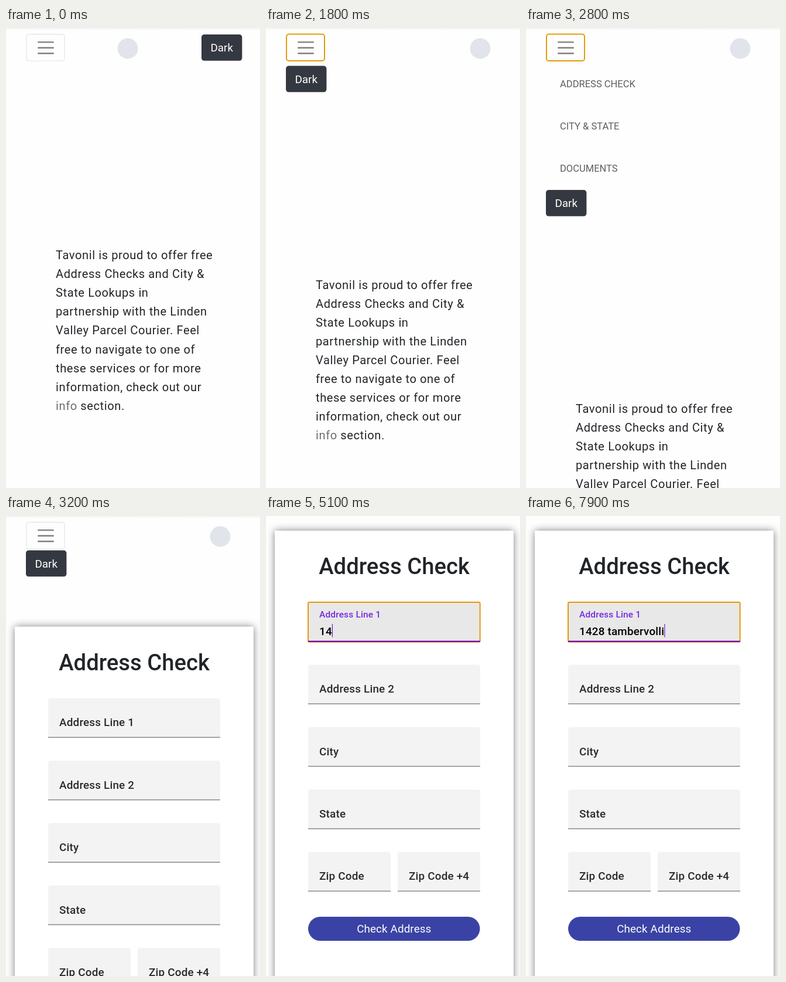
Recreate the animation shown at these times as an HTML page. Size 434 px wide and 784 px high, loop 8 s.

```html
<!DOCTYPE html>
<html lang="en">
<head>
<meta charset="utf-8">
<title>Address check</title>
<style>
  html, body { margin: 0; width: 100%; height: 100%; overflow: hidden; background: #fefefe; }
  svg { display: block; width: 434px; height: 784px; font-family: Roboto, sans-serif; font-size: 18.88px; }
  text { white-space: pre; }
  .lead { font-size: 20.06px; letter-spacing: .6px; fill: #212529; }
  .menu { font-size: 16.55px; fill: #5c5f63; }
  .title { font-size: 38.2px; font-weight: 500; fill: #212529; text-anchor: middle; }
  .label { font-weight: 500; letter-spacing: .18px; fill: #2b2b2b; }
  .entry { font-weight: 500; letter-spacing: .18px; fill: #000; }
  .card { fill: #fff; filter: drop-shadow(0 0 7px gray); }
  .ring { fill: none; stroke: #e59a0c; stroke-width: 2; }
</style>
</head>
<body>
<svg viewBox="0 0 434 784">
  <defs>
    <clipPath id="fold"><rect id="foldBox" x="0" y="57" width="434" height="0"/></clipPath>
    <linearGradient id="edge" x2="0" y2="1">
      <stop offset="0" stop-color="#f3f3f3"/><stop offset="1" stop-color="#fefefe"/>
    </linearGradient>
  </defs>
  <g id="page">
    <rect width="434" height="4" fill="url(#edge)"/>
    <g id="home"></g>
    <g id="form">
      <rect class="card" x="15" y="0" width="408" height="900"/>
      <text class="title" x="219" y="74.3">Address Check</text>
      <g id="fields"></g>
      <rect x="72" y="658" width="293.5" height="41" rx="20.5" fill="#3a43a5"/>
      <text x="218.8" y="685.3" fill="#fff" text-anchor="middle" letter-spacing=".1">Check Address</text>
      <g id="focus">
        <rect class="ring" x="72" y="122" width="293.7" height="67.5" rx="2"/>
        <rect id="line" y="187.6" height="2.4" fill="#780d98"/>
        <text id="entry" class="entry" x="91" y="177.5"></text>
        <rect id="caret" y="159" width="1.2" height="22.5" fill="#6a1fc0"/>
      </g>
    </g>
    <g id="menu" clip-path="url(#fold)"></g>
    <rect id="toggler" x="35" y="10.6" width="65" height="45.4" rx="4" fill="none"/>
    <path d="M55.2 24.1h25.6M55.2 33.7h25.6M55.2 43.3h25.6" stroke="#7f7f7f" stroke-width="2.36" stroke-linecap="round"/>
    <circle id="logo" cy="35" r="17.5" fill="#e1e4ea"/>
    <g id="dark">
      <rect width="69.4" height="44.8" rx="4.7" fill="#343840"/>
      <text x="15.4" y="29.2" fill="#fff">Dark</text>
    </g>
  </g>
</svg>
<script>
const LOOP = 8000, OPEN = 1783, CLOSE = 2890, FOLD = 350, MENU = 219;
const SCROLL_AT = 3800, SCROLL = 119, FOCUS = 4370;
const TYPED = '1428 tambervolli';
const KEYS = [4700, 5050, 5200, 5400, 5700, 5900, 6200, 6400, 6600, 6900, 7100, 7200, 7400, 7600, 7750, 7880];
const LEAD = [
  'Tavonil is proud to offer free', 'Address Checks and City &', 'State Lookups in',
  'partnership with the Linden', 'Valley Parcel Courier. Feel', 'free to navigate to one of',
  'these services or for more', 'information, check out our'
];

const $ = id => document.getElementById(id);
const clamp = x => Math.max(0, Math.min(1, x));
const set = (node, attrs) => { for (const k in attrs) node.setAttribute(k, attrs[k]); };
const show = (node, on) => { node.style.display = on ? '' : 'none'; };
const move = (node, x, y) => node.setAttribute('transform', `translate(${x} ${y})`);

function add(parent, tag, attrs, text) {
  const node = document.createElementNS('http://www.w3.org/2000/svg', tag);
  set(node, attrs);
  if (text) node.textContent = text;
  return parent.appendChild(node);
}

// CSS "ease": cubic-bezier(.25, .1, .25, 1)
function ease(x) {
  if (x <= 0 || x >= 1) return clamp(x);
  const bez = (a, b, u) => 3 * a * u * (1 - u) ** 2 + 3 * b * u * u * (1 - u) + u ** 3;
  let lo = 0, hi = 1;
  for (let i = 0; i < 24; i++) {
    const mid = (lo + hi) / 2;
    if (bez(.25, .25, mid) < x) lo = mid; else hi = mid;
  }
  return bez(.1, 1, lo);
}

LEAD.forEach((s, i) => add($('home'), 'text', { class: 'lead', x: 85, y: 394 + i * 32.1 }, s));
const last = add($('home'), 'text', { class: 'lead', x: 85, y: 650.8 });
add(last, 'tspan', { fill: '#6f6d69' }, 'info');
add(last, 'tspan', {}, ' section.');

['ADDRESS CHECK', 'CITY & STATE', 'DOCUMENTS'].forEach((s, i) =>
  add($('menu'), 'text', { class: 'menu', x: 58, y: 101.2 + i * 72 }, s));

function field(name, x, row, width) {
  const y = 122 + row * 106.4, bottom = y + 67.5;
  const box = add($('fields'), 'path', {
    d: `M${x} ${bottom}V${y + 4.7}q0-4.7 4.7-4.7h${width - 9.4}q4.7 0 4.7 4.7V${bottom}z`,
    fill: '#f3f3f3'
  });
  add($('fields'), 'rect', { x, y: bottom - 1.5, width, height: 1.5, fill: '#8a8a8a' });
  const label = add($('fields'), 'text', { class: 'label' }, name);
  move(label, x + 19, y + 47.8);
  return { box, label };
}
const first = field('Address Line 1', 72, 0, 294);
field('Address Line 2', 72, 1, 294);
field('City', 72, 2, 294);
field('State', 72, 3, 294);
field('Zip Code', 72, 4, 141);
field('Zip Code +4', 225, 4, 141);

function draw(t) {
  const unfolded = t >= OPEN && t < CLOSE + FOLD;
  const expanding = t >= OPEN && t < CLOSE;
  const h = !unfolded ? 0 : MENU * (expanding ? ease((t - OPEN) / FOLD) : 1 - ease((t - CLOSE) / FOLD));
  const push = unfolded ? 43 + h : 0;

  move($('page'), 0, t >= SCROLL_AT ? -SCROLL : 0);
  $('foldBox').setAttribute('height', h);
  show($('menu'), unfolded);
  move($('dark'), unfolded ? 34 : 334, unfolded ? 57 + h : 11);
  $('logo').setAttribute('cx', unfolded ? 366 : 208);
  set($('toggler'), {
    stroke: expanding ? '#e59a0c' : '#e3e3e3',
    'stroke-width': expanding ? 2 : 1.2
  });

  show($('home'), t < CLOSE);
  move($('home'), 0, push);
  show($('form'), t >= CLOSE);
  move($('form'), 0, 144 + push);

  const focused = t >= FOCUS;
  const up = ease((t - FOCUS) / 150);
  show($('focus'), focused);
  first.box.setAttribute('fill', focused ? '#e8e8e8' : '#f3f3f3');
  first.label.style.fill = focused ? '#7429e2' : '';
  first.label.setAttribute('transform', `translate(91 ${169.8 - 21.5 * up}) scale(${1 - .18 * up})`);

  const w = 294 * ease((t - FOCUS) / 180);
  set($('line'), { x: 219 - w / 2, width: w });
  $('entry').textContent = TYPED.slice(0, KEYS.filter(k => t >= k).length);
  if (focused) $('caret').setAttribute('x', 91 + $('entry').getComputedTextLength());
}

function tick() {
  draw(performance.now() % LOOP);
  requestAnimationFrame(tick);
}
tick();
</script>
</body>
</html>
```
